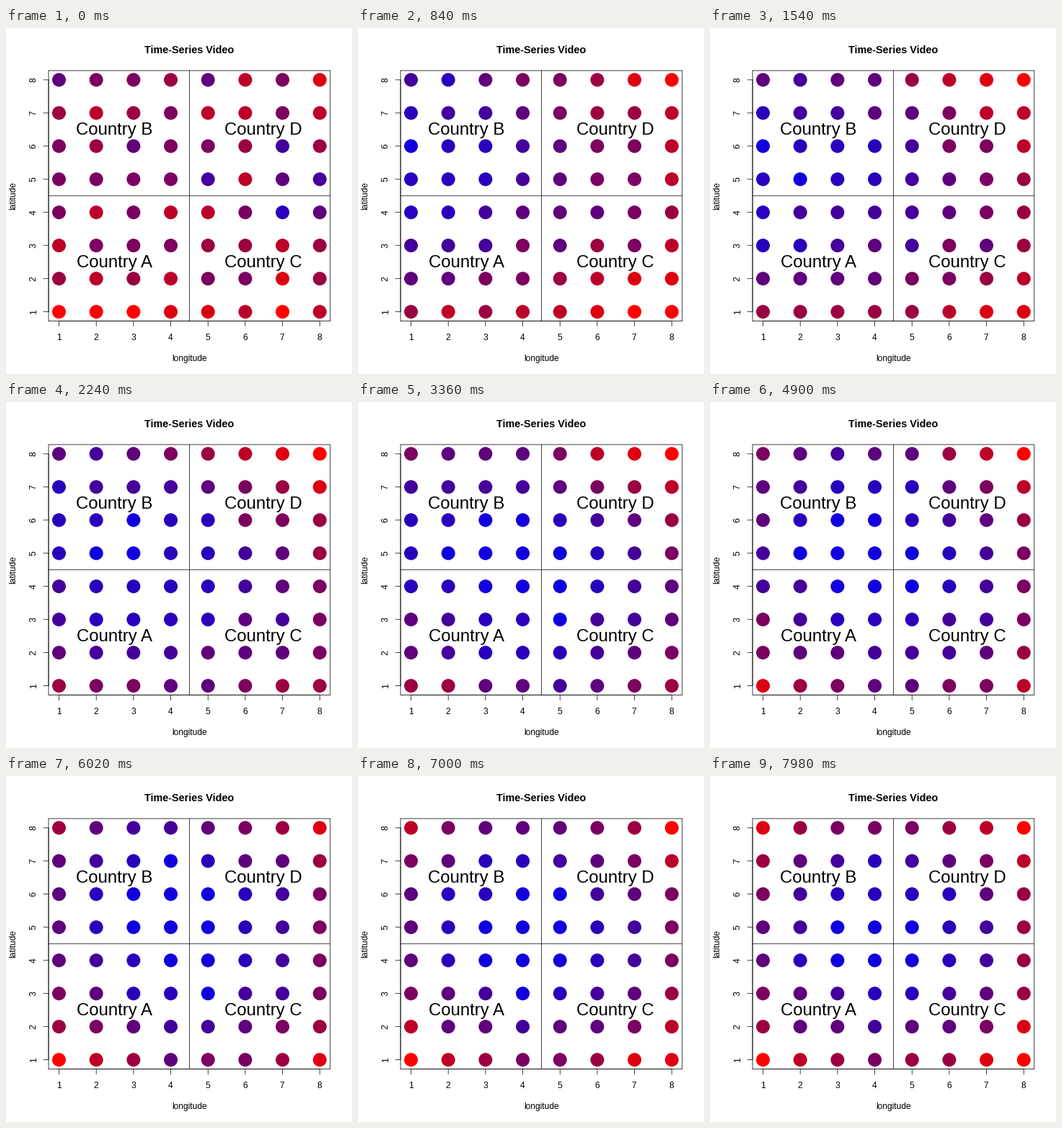
Recreate the animation shown at these times as a matplotlib script. Size 480x480 px, loop 8 s.

```python
import numpy as np
import matplotlib.pyplot as plt
from matplotlib.animation import FuncAnimation

SIZE, TICK, LOOP = 480, 40, 8000   # px, ms, ms
STEP = 140                         # ms that one reading stays on screen
N_STEPS = LOOP // STEP + 1
LEVELS = 10

# Plot box and data-to-pixel scales
LEFT, RIGHT, TOP, BOTTOM = 59.04, 449.76, 59.04, 406.56
UX, UY = (RIGHT - LEFT) / 7.56, (BOTTOM - TOP) / 7.56


def px(lon):
    return LEFT + (lon - 0.72) * UX


def py(lat):
    return BOTTOM - (lat - 0.72) * UY


lon, lat = np.meshgrid(np.arange(1, 9), np.arange(8, 0, -1))
u, v = (lon - 4.5) / 3.5, (lat - 4.5) / 3.5

# Heat surface: step -> level, eastward, northward, bowl in u, bowl in v, twist
surface = {
    0: (5.1, -0.1, -0.9, 0.0, 2.1, 0.7),
    6: (3.6, 2.5, -1.1, 0.3, 2.6, 0.7),
    20: (1.3, 1.3, 0.9, 2.1, 3.0, 1.7),
    43: (0.8, 0.5, -0.8, 3.5, 3.2, 1.1),
    57: (0.9, 0.6, -0.3, 4.0, 4.1, -0.1),
}
coefs = np.array(list(surface.values())).T

# Readings are averaged over time, so the noise settles down
rng = np.random.default_rng(8)
count = np.arange(1, N_STEPS + 1)[:, None, None]
noise = np.cumsum(rng.normal(0, 1.1, (N_STEPS, 8, 8)), axis=0) / count
noise += rng.normal(0, 0.2, noise.shape)


def levels(step):
    k, east, north, bowl_u, bowl_v, twist = (
        np.interp(step, list(surface), c) for c in coefs)
    heat = (k + east * u + north * v + bowl_u * u ** 2 + bowl_v * v ** 2
            + twist * u * v + noise[step])
    return np.clip(np.rint(heat), 0, LEVELS - 1).astype(int)


ramp = np.linspace(0, 1, LEVELS)
palette = np.column_stack([ramp ** 1.22, 0 * ramp, (1 - ramp) ** 1.22])

plt.rcParams["font.family"] = "Liberation Sans"
fig = plt.figure(figsize=(SIZE / 72, SIZE / 72), dpi=72, facecolor="white")
ax = fig.add_axes([0, 0, 1, 1])
ax.set(xlim=(0, SIZE), ylim=(SIZE, 0))
ax.axis("off")


def line(x0, y0, x1, y1):
    ax.plot([x0, x1], [y0, y1], color="black", lw=0.75, snap=False,
            solid_capstyle="round", zorder=3)


def label(x, y, text, size=12, **kw):
    ax.text(x, y, text, fontsize=size, ha="center", va="baseline",
            rotation_mode="anchor", zorder=4, **kw)


dots = ax.scatter(px(lon.ravel()), py(lat.ravel()), s=19 ** 2,
                  linewidths=0, zorder=2)

for x in (LEFT, px(4.5), RIGHT):
    line(x, TOP, x, BOTTOM)
for y in (TOP, py(4.5), BOTTOM):
    line(LEFT, y, RIGHT, y)

# Axis lines, ticks and numbers
line(px(1), BOTTOM, px(8), BOTTOM)
line(LEFT, py(1), LEFT, py(8))
for n in range(1, 9):
    line(px(n), BOTTOM, px(n), BOTTOM + 7.2)
    line(LEFT - 7.2, py(n), LEFT, py(n))
    label(px(n) - 0.5, 433, str(n))
    label(41.8, py(n), str(n), rotation=90)

label(254.4, 35, "Time-Series Video", 14.4, weight="bold")
label(254.4, 462, "longitude")
label(13, 232.8, "latitude", rotation=90)
for name, x, y in (("A", 2.5, 2.5), ("B", 2.5, 6.5),
                   ("C", 6.5, 2.5), ("D", 6.5, 6.5)):
    label(px(x) - 0.5, py(y) + 7.3, "Country " + name, 24)


def update(i):
    step = (i * TICK + TICK // 2) // STEP
    dots.set_facecolor(palette[levels(step).ravel()])
    return (dots,)


anim = FuncAnimation(fig, update, frames=LOOP // TICK, interval=TICK,
                     repeat=True, repeat_delay=0, blit=False)
plt.show()
```
